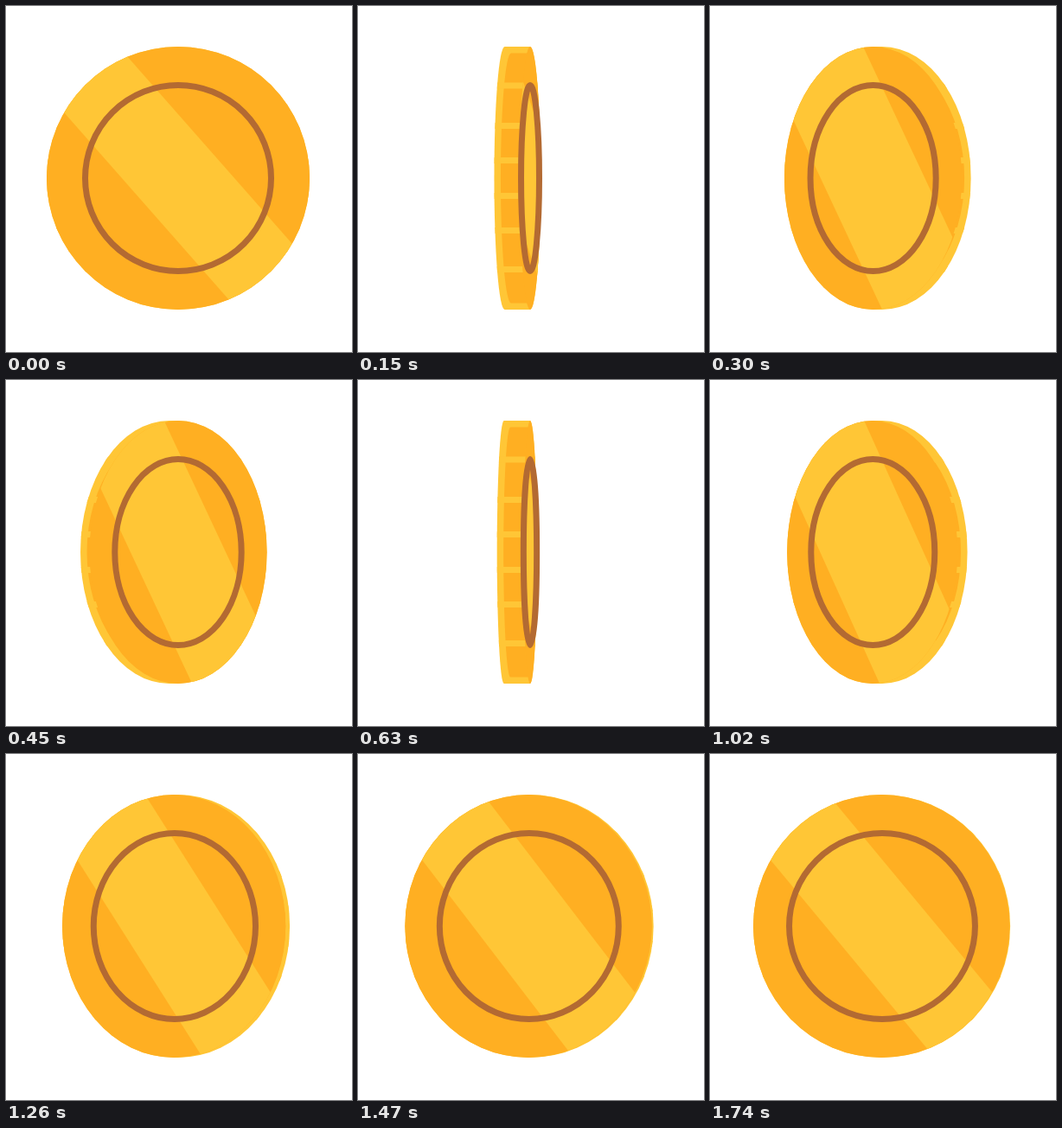
These frames come from a looping animation (400x400 px, 1800 ms). An HTML page with a canvas:

```html
<!DOCTYPE html>
<html>
<head>
<meta charset="utf-8">
<title>Coin</title>
<style>
  html, body { margin: 0; width: 100%; height: 100%; overflow: hidden; background: #fff; }
  canvas { display: block; width: 400px; height: 400px; }
</style>
</head>
<body>
<canvas id="stage" width="400" height="400"></canvas>
<script>
const ctx = document.getElementById('stage').getContext('2d');
const LIGHT = '#ffc636', DARK = '#ffaf22', BROWN = '#b36a32';
const LOOP = 1800, STEP = 30;
const C = 199, R = 152, RING = 107.5, DEPTH = 32, RIM = 7.5;
const GROOVES = [-107, -60.5, -20.5, 20.5, 60.5, 105.5];

// Quarter turns left until the coin rests: four at the start, slowing to none.
function turnsLeft(t) {
  const p = t / LOOP;
  const power = 3.09 - 0.2 * (p - 0.42) - 0.65 * Math.abs(p - 0.42);
  return 4 * Math.pow(1 - p, power);
}

// Outline swept by an ellipse moving sideways from x1 to x2.
function sweep(x1, x2, rx, ry) {
  ctx.beginPath();
  ctx.ellipse(x1, C, rx, ry, 0, Math.PI / 2, Math.PI * 1.5);
  ctx.ellipse(x2, C, rx, ry, 0, -Math.PI / 2, Math.PI / 2);
  ctx.closePath();
}

// The rim is a light band; the dark side starts a little nearer to the face.
function drawEdge(left, rx, isBack) {
  const inner = isBack ? Math.min(left + RIM, C) : left;
  const outer = isBack ? C : Math.max(C - RIM, left);
  sweep(left, C, rx, R);
  ctx.fillStyle = LIGHT;
  ctx.fill();
  ctx.save();
  ctx.clip();
  sweep(inner, outer, rx, R - RIM);
  ctx.fillStyle = DARK;
  ctx.fill();
  ctx.fillStyle = LIGHT;
  for (const y of GROOVES) ctx.fillRect(0, C + y - 3.5, 400, 7);
  ctx.restore();
}

function drawFace(x, k, isBack) {
  const lean = (0.35 + 0.53 * Math.pow(k, 3.8)) * R;
  const half = 43 + 33 * k - 11 * k * k - (isBack ? 16 * (1 - k) : 0);
  const mid = x - (isBack ? 0 : 5 * (1 - k) ** 2);
  ctx.save();
  sweep(x, x, R * k, R);
  ctx.clip();
  ctx.fillStyle = DARK;
  ctx.fillRect(0, 0, 400, 400);
  ctx.beginPath();
  ctx.moveTo(mid - lean - half, C - R);
  ctx.lineTo(mid - lean + half, C - R);
  ctx.lineTo(mid + lean + half, C + R);
  ctx.lineTo(mid + lean - half, C + R);
  ctx.fillStyle = LIGHT;
  ctx.fill();
  ctx.restore();
}

function drawRing(x, open) {
  sweep(x, x, RING * open, RING);
  ctx.strokeStyle = BROWN;
  ctx.lineWidth = 7;
  ctx.stroke();
}

function draw(t) {
  const left = turnsLeft(t);
  const quarter = Math.ceil(left);
  const isBack = quarter % 2 === 0;
  const part = left - quarter + 1;
  // The back closes on the right, then the front opens on the left.
  const open = isBack ? part : 1 - part;
  // The last turn settles a touch short of a full circle.
  const full = quarter > 1 ? 1 : 0.975;
  const k = isBack ? Math.max(1.02 * open - 0.02, 0) : full * open;
  const shifted = C - DEPTH * (1 - k);

  ctx.clearRect(0, 0, 400, 400);
  drawEdge(shifted, R * k, isBack);
  drawFace(isBack ? C : shifted, k, isBack);
  drawRing(isBack ? C : C - DEPTH * (1 - open), open);
}

const start = performance.now();
function tick() {
  const t = (performance.now() - start) % LOOP;
  draw(Math.min(Math.floor(t / STEP) * STEP, LOOP - 2 * STEP));
  requestAnimationFrame(tick);
}
tick();
</script>
</body>
</html>
```
